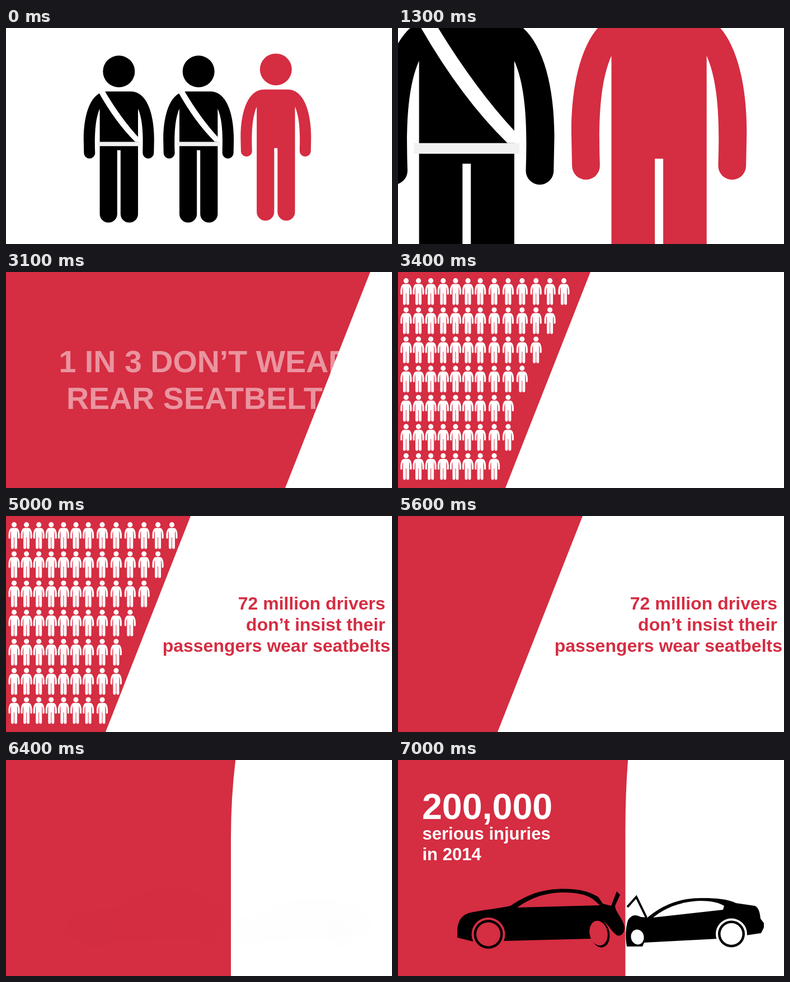
Write an HTML page with a canvas that moves like this. It is 690 by 388 pixels and loops after 8000 ms.

```html
<!DOCTYPE html>
<html lang="en">
<head>
<meta charset="utf-8">
<title>Rear seatbelts</title>
<style>
html, body { margin: 0; width: 100%; height: 100%; overflow: hidden; background: #fff; }
canvas { display: block; }
</style>
</head>
<body>
<canvas id="stage" width="690" height="388"></canvas>
<script>
const W = 690, H = 388, LOOP = 8000;
const RED = '#d52d42', WHITE = '#fff', BLACK = '#000';
const ctx = document.getElementById('stage').getContext('2d');

const ramp = (t, from, to) => Math.min(1, Math.max(0, (t - from) / (to - from)));
const smooth = p => p * p * (3 - 2 * p);
const easeOut = p => 1 - (1 - p) ** 2;

// Person centred on x = 0
const person = new Path2D(`M-22 114 H22 C48 114 63 150 63 200 L62.5 224.5
  A10 10 0 0 1 42.5 224.5 C43.5 195 43 165 34.2 145 V334
  A15.6 15.6 0 0 1 3 334 V219.4 H-3 V334 A15.6 15.6 0 0 1 -34.2 334 V145
  C-43 165 -43.5 195 -42.5 224.5 A10 10 0 0 1 -62.5 224.5 L-63 200
  C-63 150 -48 114 -22 114 Z`);
person.arc(0, 78, 28.5, 0, 2 * Math.PI);
const sash = new Path2D(`M-37.5 113 Q-6 170 29.3 204.5 H35 V196.5 Q4 163 -25.5 113 Z`);

const leftBody = new Path2D(`M106 319 V303 C108 290 112 280 126 275 C150 269 180 267 201 262
  C225 246 250 233 290 231.5 C325 231 341 236 358 246 L366 258 L381 262 L391 236 L397 242
  L388 262 C388 273 405 288 405 302 C404 314 396 318 390 314 C380 306 374 292 366 290
  L345 321 L190 325 L134 326 Z`);
const leftWindow = new Path2D(`M213 265 C235 250 255 240 290 238 C320 237 341 242 352 253 L361 261 Z`);
const rightBody = new Path2D(`M409 335 C406 318 407 300 411 288 C416 279 424 276 434 282 L446 283
  C475 258 510 247 545 248 C570 248 590 250 604 257 L638 262 C645 265 647 275 648 285
  L654 293 V301 L649 311 L622 315 L573 321 L440 328 L437 335 Z`);
const rightWindow = new Path2D(`M456 283 C480 263 510 254 540 253 C560 253 573 256 583 262 L581 269 Z`);
const brokenHood = new Path2D('M410 264 L426 246 L444 283');

function fill(path, color) {
  ctx.fillStyle = color;
  ctx.fill(path);
}

function ellipse(x, y, rx, ry, color, angle = 0) {
  ctx.fillStyle = color;
  ctx.beginPath();
  ctx.ellipse(x, y, rx, ry, angle, 0, 2 * Math.PI);
  ctx.fill();
}

function text(str, x, y, size, color, align = 'left') {
  ctx.font = `bold ${size}px "Liberation Sans", Arial, sans-serif`;
  ctx.textAlign = align;
  ctx.fillStyle = color;
  ctx.fillText(str, x, y);
}

function group(alpha, draw) {
  if (alpha <= 0) return;
  ctx.save();
  ctx.globalAlpha = alpha;
  draw();
  ctx.restore();
}

function zoomAt(x, y, scale, toX = x, toY = y) {
  ctx.translate(toX, toY);
  ctx.scale(scale, scale);
  ctx.translate(-x, -y);
}

function drawPerson(x, y, color, scale = 1, belted = false) {
  ctx.save();
  ctx.translate(x, y);
  ctx.scale(scale, scale);
  fill(person, color);
  if (belted) {
    fill(sash, WHITE);
    ctx.fillStyle = '#f1f1f1';
    ctx.fillRect(-38, 204.5, 76, 7.7);
  }
  ctx.restore();
}

function drawTrio() {
  drawPerson(201.8, 0, BLACK, 1, true);
  drawPerson(344.2, 0, BLACK, 1, true);
  drawPerson(482.4, -3.6, RED);
}

function drawHeadline() {
  text('1 IN 3 DON’T WEAR', 355.5, 180, 55.6, WHITE, 'center');
  text('REAR SEATBELTS', 355.5, 246, 55.6, WHITE, 'center');
}

function drawCrowd() {
  [13, 12, 11, 10, 9, 9, 8].forEach((count, row) => {
    for (let i = 0; i < count; i++) {
      const x = i < 7 ? 14.5 + 22.1 * i : 172 + 24.9 * (i - 7);
      drawPerson(x, 3.2 + 52.4 * row, WHITE, 0.16);
    }
  });
}

function drawDriverText() {
  text('72 million drivers', 678, 168, 32, RED, 'right');
  text('don’t insist their', 678, 206, 32, RED, 'right');
  text('passengers wear seatbelts', 687, 244, 32, RED, 'right');
}

function drawWheel(x, y, r, color) {
  ellipse(x, y, r + 4, r + 4, color);
  ellipse(x, y, r, r, BLACK);
  ellipse(x, y, r - 4.5, r - 4.5, color);
}

function drawCrash() {
  fill(leftBody, BLACK);
  fill(leftWindow, RED);
  drawWheel(161.5, 313, 26, RED);
  ellipse(361, 312, 17, 25, BLACK, -0.2);
  ellipse(358.5, 311, 16, 22.5, RED, -0.2);

  fill(rightBody, BLACK);
  fill(rightWindow, WHITE);
  ctx.strokeStyle = BLACK;
  ctx.lineWidth = 4;
  ctx.stroke(brokenHood);
  drawWheel(596, 312.5, 24, WHITE);
  ellipse(428, 318, 11.5, 13.5, WHITE, -0.2);

  text('200,000', 43, 106, 64.5, WHITE);
  text('serious injuries', 43.5, 143, 31, WHITE);
  text('in 2014', 43.5, 180, 31, WHITE);
}

// Zoom from the three people into the red one
function sceneTrio(t) {
  const p = smooth(ramp(t, 1052, 1900)), maxScale = 80;
  const scale = maxScale ** p;
  group(1, () => { zoomAt(493, 203, scale); drawTrio(); });
  group(ramp(p, 0.5, 0.95), () => { zoomAt(493, 203, scale / maxScale); drawHeadline(); });
}

// Slanted wipe, then a zoom into the letter n
function sceneCrowd(t) {
  const logScale = 5.266 * easeOut(ramp(t, 6100, 6500));
  group(ramp(t, 3450, 3800), () => {
    zoomAt(377.027, 235, Math.exp(logScale),
      377 + 0.45 * logScale ** 2.5, 235 - 3.5 * logScale ** 2);
    drawDriverText();
  });

  const edge = 845 - 515 * easeOut(ramp(t, 3000, 3480)) - 345 * ramp(t, 6100, 6433) ** 2;
  fill(new Path2D(`M0 0 H${edge} L${edge - 152} ${H} H0 Z`), RED);
  group(1 - ramp(t, 3000, 3200), drawHeadline);
  group(ramp(t, 3100, 3350) * (1 - ramp(t, 5050, 5500)), drawCrowd);
  group(ramp(t, 6400, 6800), drawCrash);
}

function render(t) {
  ctx.fillStyle = WHITE;
  ctx.fillRect(0, 0, W, H);
  (t < 3000 ? sceneTrio : sceneCrowd)(t);
}

const start = performance.now();
function tick() {
  render((performance.now() - start) % LOOP);
  requestAnimationFrame(tick);
}
tick();
</script>
</body>
</html>
```
